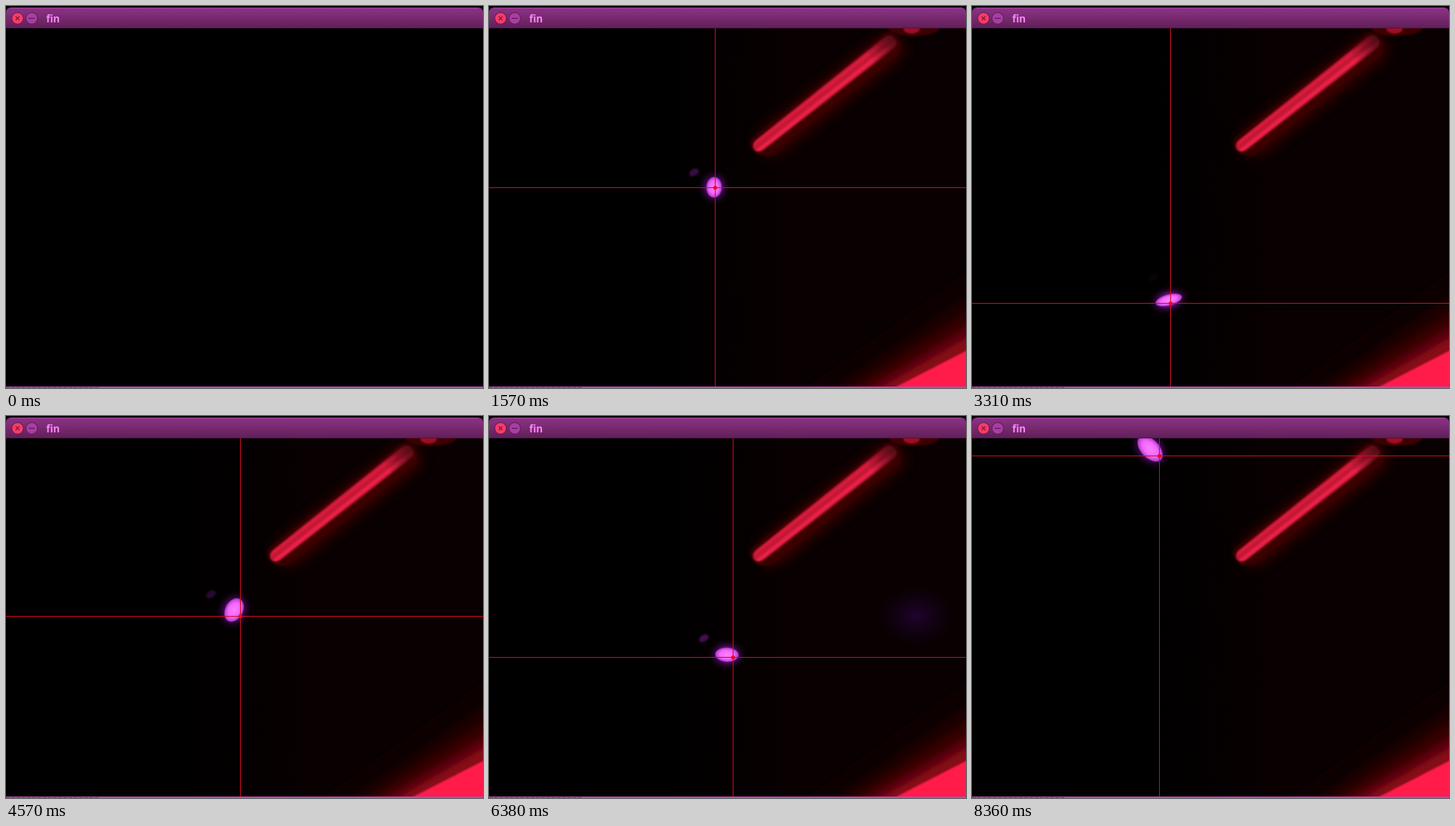
Write an HTML page that moves like this. It is 640x512 px and loops after 8420 ms.

```html
<!DOCTYPE html>
<html lang="en">
<head>
<meta charset="utf-8">
<title>fin</title>
<style>
html, body { margin: 0; width: 100%; height: 100%; overflow: hidden; background: #000; }
svg { display: block; width: 100vw; height: 100vh; }
.title { font: 700 13.5px "Noto Sans", "Open Sans", sans-serif; fill: #fb86fb; }
</style>
</head>
<body>
<svg viewBox="0 0 640 512">
  <defs>
    <clipPath id="cam"><rect y="30" width="640" height="480"/></clipPath>
    <filter id="soft" x="-20%" y="-50%" width="140%" height="200%"><feGaussianBlur stdDeviation="1.3"/></filter>
    <filter id="haze" x="-30%" y="-150%" width="160%" height="400%"><feGaussianBlur stdDeviation="9"/></filter>
    <filter id="fan" x="-20%" y="-20%" width="140%" height="140%"><feGaussianBlur stdDeviation="4"/></filter>
    <linearGradient id="bar" x2="0" y2="1">
      <stop stop-color="#8a3084"/><stop offset=".2" stop-color="#84307e"/>
      <stop offset=".6" stop-color="#732769"/><stop offset="1" stop-color="#5f1f5a"/>
    </linearGradient>
    <linearGradient id="tube" x2="0" y2="1">
      <stop stop-color="#8c0c22"/><stop offset=".2" stop-color="#df1c3e"/>
      <stop offset=".5" stop-color="#bd1535"/><stop offset=".76" stop-color="#f8264c"/>
      <stop offset="1" stop-color="#8c0a20"/>
    </linearGradient>
    <linearGradient id="fade">
      <stop offset=".82" stop-color="#200004" stop-opacity="0"/>
      <stop offset="1" stop-color="#200004" stop-opacity=".75"/>
    </linearGradient>
    <linearGradient id="room">
      <stop offset=".35" stop-color="#090001" stop-opacity="0"/>
      <stop offset=".65" stop-color="#090001"/>
    </linearGradient>
    <radialGradient id="core">
      <stop stop-color="#ff80ff"/><stop offset=".6" stop-color="#f268fa"/>
      <stop offset=".88" stop-color="#c743dc"/><stop offset="1" stop-color="#7a2496"/>
    </radialGradient>
    <radialGradient id="aura">
      <stop offset=".35" stop-color="#7c2098" stop-opacity=".9"/>
      <stop offset=".6" stop-color="#4a0c5c" stop-opacity=".6"/>
      <stop offset="1" stop-color="#180020" stop-opacity="0"/>
    </radialGradient>
    <radialGradient id="dim">
      <stop stop-color="#26043a" stop-opacity=".9"/>
      <stop offset="1" stop-color="#180420" stop-opacity="0"/>
    </radialGradient>
  </defs>
  <rect width="640" height="512"/>
  <g id="view" clip-path="url(#cam)">
    <rect y="30" width="640" height="480" fill="url(#room)"/>
    <ellipse id="glow" rx="52" ry="42" fill="url(#dim)"/>
    <g transform="translate(450 118) rotate(-38.2)">
      <rect x="-112" y="-13" width="236" height="38" rx="16" fill="#4a0006" opacity=".85" filter="url(#haze)"/>
      <path d="M-112-14H112Q124-12 124 0T112 20H-106Q-122 14-122 0T-112-14Z" fill="#3c0006" opacity=".75" filter="url(#soft)"/>
      <g filter="url(#soft)">
        <path id="lamp" d="M-110-8.5L110-10.5Q120-9 120 0T110 10L-110 8.5Q-120 7-120 0T-110-8.5Z" fill="url(#tube)"/>
        <path d="M-110-8.5L110-10.5Q120-9 120 0T110 10L-110 8.5Q-120 7-120 0T-110-8.5Z" fill="url(#fade)"/>
      </g>
    </g>
    <ellipse cx="570" cy="30" rx="34" ry="10" fill="#3c0006" filter="url(#soft)"/>
    <ellipse cx="567" cy="31" rx="11" ry="6" fill="#a01024" filter="url(#soft)"/>
    <g id="wedge"></g>
    <ellipse id="ghost" rx="7" ry="4.5" fill="#5a1470" filter="url(#soft)"/>
    <g id="spot">
      <ellipse id="halo" fill="url(#aura)"/>
      <ellipse id="blob" fill="url(#core)"/>
    </g>
    <g fill="#d00c1c">
      <rect id="lineX" y="30" width="1" height="480"/>
      <rect id="lineY" width="640" height="1"/>
      <circle id="dot" r="2.6" fill="#e80c24"/>
    </g>
  </g>
  <path d="M0 30V9Q0 2 7 2H633Q640 2 640 9V30Z" fill="url(#bar)"/>
  <path d="M6 3H634" stroke="#9c4296"/>
  <path d="M0 29.5H640" stroke="#4a1846"/>
  <circle cx="15.5" cy="16.5" r="7.8" fill="#f63c68" stroke="#5c1650"/>
  <path d="M13 14l5 5m0-5l-5 5" stroke="#7c1838" stroke-width="1.2"/>
  <circle cx="34.5" cy="16.5" r="7.8" fill="#a83ea2" stroke="#5c1650"/>
  <path d="M30.5 16.5h8" stroke="#5a1858" stroke-width="1.2"/>
  <text class="title" x="54" y="21.5">fin</text>
  <rect y="510" width="640" height="2" fill="#b848b6"/>
  <path d="M0 511.5H125" stroke="#7c2c7a" stroke-dasharray="5 2"/>
</svg>
<script>
const LOOP = 8420, START = 130, STEP = 60, RESYNC = 5420;
const $ = id => document.getElementById(id);
const set = (id, attrs) => {
  for (const k in attrs) $(id).setAttribute(k, attrs[k]);
};

// time, cross x y, cross lead over spot x y, spot radii, angle, ghost x y alpha
const KEYS = [
  [130, 262, 150, 2, -3, 15, 10, -60, -27, -21, .5],
  [1570, 303, 243, 1, 0, 14, 10.5, -88, -27, -20, .6],
  [3310, 266, 398, 2, 4, 18.5, 7.5, -15, -21, -30, .1],
  [4570, 314, 268, 8, 8, 17, 12, -62, -31, -21, .45],
  [5540, 282, 276, 1, 0, 15, 10, 0, -32, -21, .8],
  [7160, 281, 326, 14, 6, 17, 9.5, 5, -30, -23, .6],
  [8360, 251, 53, 12, 9, 21, 12.5, 46, -28, -22, 0]
];

// Glow from the hand: time, x, y, alpha
const GLOW = [[4570, 540, 390, 0], [5540, 548, 372, .9], [7160, 597, 171, .9], [8360, 610, 120, 0]];

const WEDGE = [
  [425, 352, '#0d0006'], [462, 385, '#1c0005'], [485, 407, '#360005'],
  [506, 427, '#580008'], [525, 443, '#860818']
];

function segment(keys, t) {
  let i = 0;
  while (i < keys.length - 2 && t >= keys[i + 1][0]) i++;
  const a = keys[i], b = keys[i + 1], span = b[0] - a[0];
  const u = Math.min(1, Math.max(0, (t - a[0]) / span));
  return { a, b, u, span, mix: n => a[n] + (b[n] - a[n]) * u };
}

// The cross trails the spot by one camera step, so its lead gives the velocity.
function hermite({ a, b, u, span }, n) {
  const m = span / STEP, u2 = u * u, u3 = u2 * u;
  return (2 * u3 - 3 * u2 + 1) * a[n] - (u3 - 2 * u2 + u) * m * a[n + 2]
    + (3 * u2 - 2 * u3) * b[n] - (u3 - u2) * m * b[n + 2];
}

function stepTime(t) {
  const base = t < RESYNC ? START : RESYNC;
  const s = base + Math.floor((t - base) / STEP) * STEP;
  return t < RESYNC ? Math.min(s, RESYNC - 70) : Math.min(s, 8360);
}

function draw(now) {
  const t = now % LOOP;
  set('view', { visibility: t < START ? 'hidden' : 'visible' });
  if (t < START) return;
  const time = stepTime(t), s = segment(KEYS, time);
  const x = Math.round(hermite(s, 1)), y = Math.round(hermite(s, 2));
  const sx = x - s.mix(3), sy = y - s.mix(4), rx = s.mix(5), ry = s.mix(6);

  set('lineX', { x });
  set('lineY', { y });
  set('dot', { cx: x + .5, cy: y + .5 });
  set('spot', { transform: `translate(${sx} ${sy}) rotate(${s.mix(7)})` });
  set('blob', { rx, ry });
  set('halo', { rx: rx + 11, ry: ry + 12 });
  set('ghost', {
    transform: `translate(${sx + s.mix(8)} ${sy + s.mix(9)}) rotate(-30)`,
    opacity: s.mix(10)
  });

  const g = segment(GLOW, time);
  set('glow', { cx: g.mix(1), cy: g.mix(2), opacity: g.mix(3) });
}

const fan = (x, y, color, filter) =>
  `<path d="M${x} 512L660 ${y - 10}V540H${x - 30}Z" fill="${color}" filter="url(#${filter})"/>`;
$('wedge').innerHTML = WEDGE.map(w => fan(...w, 'fan')).join('')
  + fan(543, 462, '#ff1c4c', 'soft');

const t0 = performance.now();
function tick() {
  draw(performance.now() - t0);
  requestAnimationFrame(tick);
}
tick();
</script>
</body>
</html>
```
